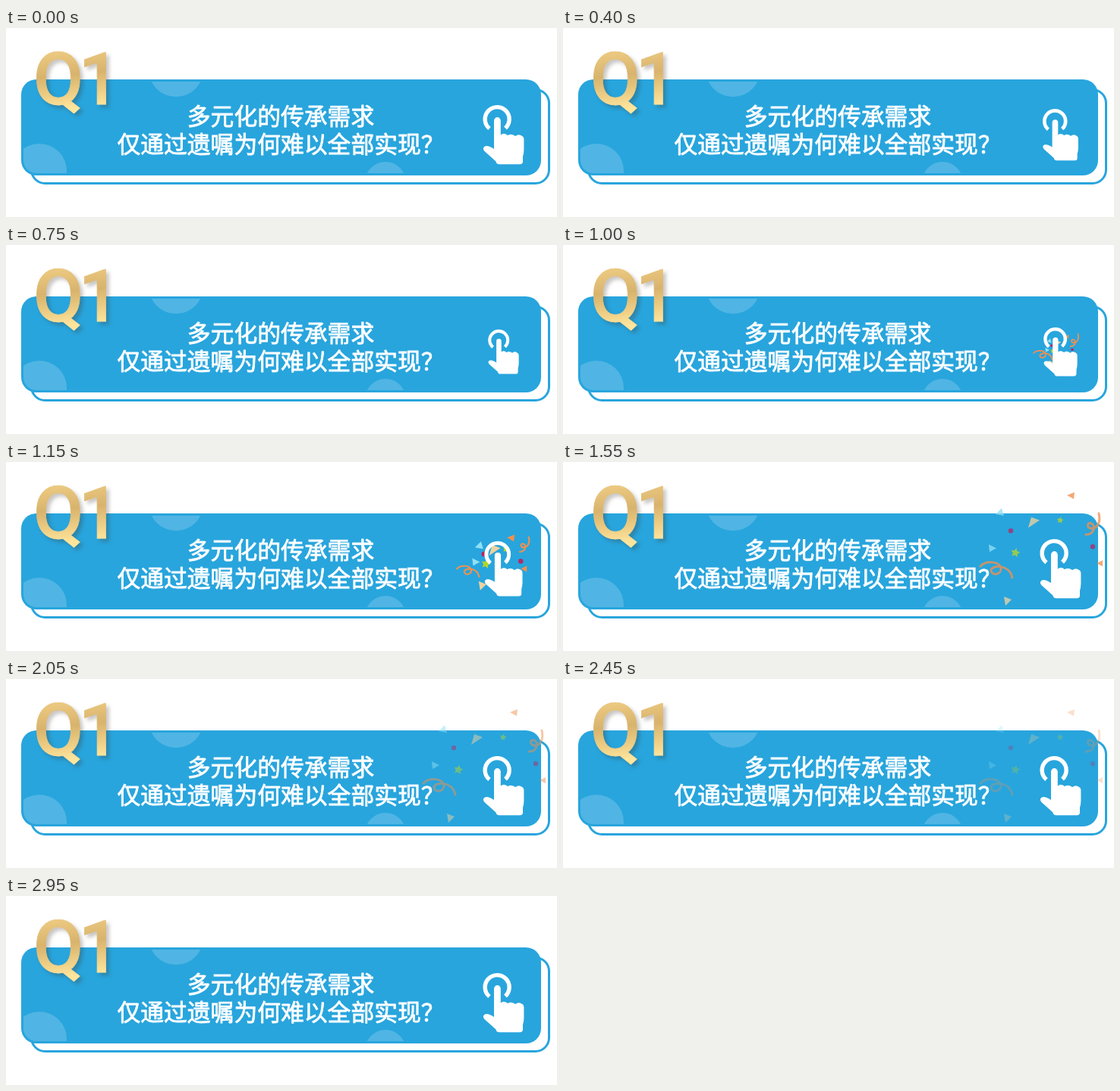
Write an HTML page that moves like this. It is 726 px wide and 250 px high and loops after 3 s.

```html
<!DOCTYPE html>
<html lang="zh">
<head>
<meta charset="utf-8">
<title>Q1</title>
<style>
  html, body { margin: 0; width: 100%; height: 100%; overflow: hidden; background: #fff; }
  svg { display: block; width: 726px; height: 250px; }
  .title {
    font: 500 30.8px "Noto Sans CJK SC", "Noto Sans CJK", sans-serif;
    fill: #fff; stroke: #fff; stroke-width: .8px; text-anchor: middle;
  }
  .num {
    font: 500 96px Roboto, sans-serif;
    fill: url(#gold); stroke: url(#gold); stroke-width: .8px;
    filter: drop-shadow(4px 4px 2.5px rgba(60, 50, 40, .28));
  }
</style>
</head>
<body>
<svg viewBox="0 0 726 250">
  <defs>
    <linearGradient id="gold" gradientUnits="userSpaceOnUse" x1="82" y1="32" x2="90" y2="106">
      <stop offset="0" stop-color="#ebc880"/>
      <stop offset=".4" stop-color="#d8b36c"/>
      <stop offset=".7" stop-color="#eccb82"/>
      <stop offset="1" stop-color="#ffe59c"/>
    </linearGradient>
    <clipPath id="inner"><rect x="23" y="71" width="679" height="121" rx="17"/></clipPath>
  </defs>

  <rect x="33.5" y="81.5" width="682" height="124" rx="18" fill="#fff" stroke="#28a5dd" stroke-width="3"/>
  <rect x="20" y="68" width="685" height="127" rx="20" fill="#28a5dd"/>
  <g clip-path="url(#inner)" fill="#50b5e4">
    <circle cx="224" cy="55" r="36"/>
    <circle cx="44" cy="189" r="36"/>
    <circle cx="500" cy="204" r="27"/>
  </g>

  <g class="num">
    <text x="36" y="101">Q</text>
    <text x="95.5" y="101">1</text>
  </g>

  <text class="title" x="362" y="128">多元化的传承需求</text>
  <text class="title" x="362" y="164.5">仅通过遗嘱为何难以全部实现？</text>

  <g id="confetti"></g>

  <g id="hand" fill="#fff">
    <path d="M637 133 A16 16 0 1 1 658 132.4" fill="none" stroke="#fff" stroke-width="5.4"/>
    <path d="M643 160 V122.5 a4.4 4.4 0 0 1 8.8 0 V141.5
      Q656 138 661 142 Q666 139 671 143 Q675 140 678.5 142 Q682.4 143.5 682.4 147
      V161 Q682.4 166 681 170 V176.5 Q681 180.3 677 180.3 H650 Q646 180.3 645.5 176.5
      L630.5 163 Q627 158.5 631 156.5 Q635 154.8 643 160 Z"/>
  </g>
</svg>

<script>
const LOOP = 3000, STEP = 50;
const CENTER = [662, 147];
const scaleKeys = [[0, 1], [400, .87], [750, .75], [850, .717], [1250, 1], [LOOP, 1]];
const spreadKeys = [[850, .05], [1150, .45], [1530, 1], [LOOP, 1]];
const fadeKeys = [[850, 0], [950, 1], [1150, 1], [2950, 0], [LOOP, 0]];

const orange = '#f0914f', sky = '#8fe0f5', tan = '#ecd3a0', green = '#b4d62a', plum = '#b02a68';

const triangle = p => `M${p}Z`;
const dot = r => `M${-r} 0a${r} ${r} 0 1 0 ${2 * r} 0a${r} ${r} 0 1 0 ${-2 * r} 0Z`;
function star(r) {
  const pts = [];
  for (let i = 0; i < 10; i++) {
    const a = i * Math.PI / 5 - 1.35, d = i % 2 ? r * .5 : r;
    pts.push(`${(d * Math.cos(a)).toFixed(2)} ${(d * Math.sin(a)).toFixed(2)}`);
  }
  return `M${pts.join('L')}Z`;
}

// resting x, y, colour, path around that point, curl flag
const pieces = [
  [669, 45, orange, triangle('-5 -1L5 -5L4 4')],
  [575, 67, sky, triangle('-5 2L3 -6L6 4')],
  [619, 80, tan, triangle('-6 7L-2 -7L9 -3')],
  [655, 77, green, star(4.6)],
  [590, 91, plum, dot(3.2)],
  [565, 114, sky, triangle('-4 -5L6 0L-3 5')],
  [596, 120, green, star(6.4)],
  [698, 112, plum, dot(3.2)],
  [707, 134, orange, triangle('-4 0L4 -4L4 4')],
  [586, 184, tan, triangle('-5 -6L5 -2L-3 6')],
  [571, 142, orange, 'M-21 -4C-15 -11 3 -12 6 -2C7 7 -5 9 -7 2C-8 -6 17 -8 21 11', true],
  [697, 82, orange, 'M9 -14C12 -1 6 6 -1 6C-8 5 -6 -3 -1 -1C6 3 2 14 -8 14', true],
];

const box = document.getElementById('confetti');
const hand = document.getElementById('hand');

const nodes = pieces.map(([, , color, d, curl]) => {
  const node = document.createElementNS('http://www.w3.org/2000/svg', 'path');
  node.setAttribute('d', d);
  node.setAttribute('fill', curl ? 'none' : color);
  if (curl) {
    node.setAttribute('stroke', color);
    node.setAttribute('stroke-width', 3);
    node.setAttribute('stroke-linecap', 'round');
  }
  box.append(node);
  return node;
});

function at(keys, t) {
  if (t <= keys[0][0]) return keys[0][1];
  const i = keys.findIndex(k => k[0] >= t);
  const [t0, v0] = keys[i - 1], [t1, v1] = keys[i];
  return v0 + (v1 - v0) * (t - t0) / (t1 - t0);
}

function draw(t) {
  const s = at(scaleKeys, t), spread = at(spreadKeys, t);
  hand.setAttribute('transform', `translate(655.5 141.5) scale(${s}) translate(-655.5 -141.5)`);
  box.setAttribute('opacity', at(fadeKeys, t));
  pieces.forEach(([x, y, , , curl], i) => {
    // curls fly a little faster than the small pieces
    const reach = curl ? Math.min(1, 1.3 * spread) : spread;
    const px = CENTER[0] + (x - CENTER[0]) * reach;
    const py = CENTER[1] + (y - CENTER[1]) * reach;
    const size = curl ? .45 + .55 * spread : Math.min(1, 2.3 * spread);
    nodes[i].setAttribute('transform', `translate(${px} ${py}) scale(${size})`);
  });
}

const start = performance.now();
function tick() {
  const t = (performance.now() - start) % LOOP;
  draw(Math.floor(t / STEP) * STEP);
  requestAnimationFrame(tick);
}
tick();
</script>
</body>
</html>
```
